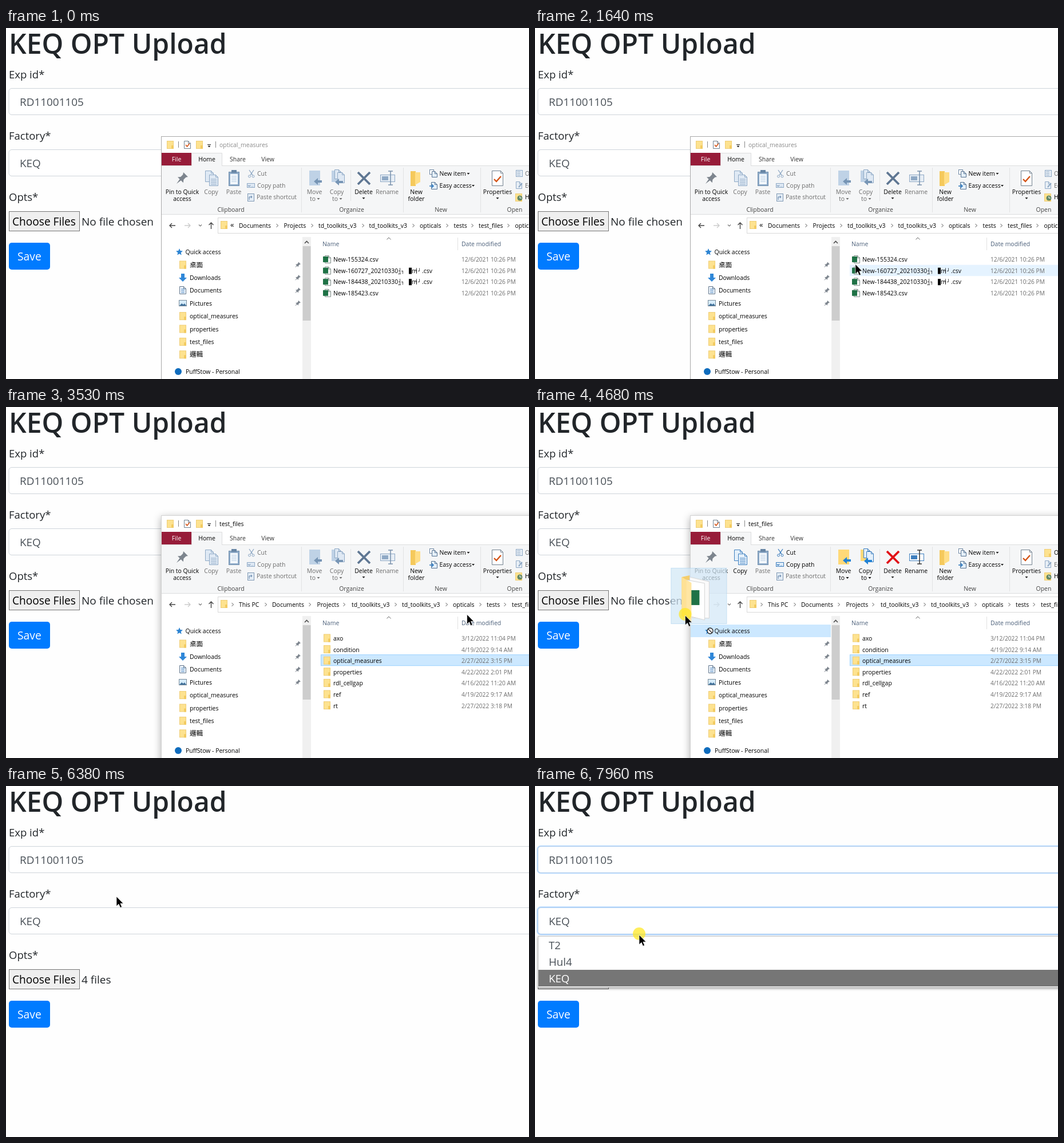
An HTML page for the animation above (8000 ms loop, 914 by 613 pixels).

```html
<!DOCTYPE html>
<html lang="en">
<head>
<meta charset="utf-8">
<title>Upload form</title>
<style>
  html, body { margin: 0; width: 100%; height: 100%; overflow: hidden; background: #fefefe; }
  svg { display: block; width: 914px; height: 613px; font-family: "Open Sans", "Noto Sans CJK TC", "Noto Sans CJK JP", "Noto Sans", sans-serif; }
  text { white-space: pre; }
  .active { filter: drop-shadow(0 4px 7px rgba(0, 0, 0, .32)); }
</style>
</head>
<body>
<svg id="stage" viewBox="0 0 914 613"></svg>
<script>
const LOOP = 8000, ROW = 19.6, ROW_TOP = 394;
const INK = '#212529', FIELD = '#495057', DIM = '#6d6d6d', SITE = 'KEQ';

// Drawing helpers
const text = (x, y, s, o = {}) =>
  `<text x="${x}" y="${y}" font-size="${o.size || 10.45}" fill="${o.fill || '#000'}" text-anchor="${o.mid ? 'middle' : 'start'}" font-weight="${o.weight || 400}">${s}</text>`;
const rect = (x, y, w, h, fill, stroke = 'none', more = '') =>
  `<rect x="${x}" y="${y}" width="${w}" height="${h}" fill="${fill}" stroke="${stroke}" ${more}/>`;
const path = (d, fill, stroke = 'none', width = 1, more = '') =>
  `<path d="${d}" fill="${fill}" stroke="${stroke}" stroke-width="${width}" ${more}/>`;
const disc = (x, y, r, fill, more = '') => `<circle cx="${x}" cy="${y}" r="${r}" fill="${fill}" ${more}/>`;
const group = (id, body, more = '') => `<g id="${id}" ${more}>${body}</g>`;
const at = (x, y, body, scale = 1) => `<g transform="translate(${x} ${y}) scale(${scale})">${body}</g>`;
const label = (x, y, s, fill) => text(x, y, s, { mid: true, fill });
const caret = (x, y, fill = '#222') => path(`M${x - 2.5} ${y}h5l-2.5 3z`, fill);
const chevron = (x, y) => path(`M${x - 1.5} ${y - 3}l3 3-3 3`, 'none', '#555');
const page = (x, y, w, h, fill, line) =>
  path(`M${x} ${y}h${w - 4}l4 4v${h - 4}h${-w}z`, fill, line) + path(`M${x + w - 4} ${y}v4h4`, 'none', line);
const folder = (x, y, s = 1) => at(x, y, rect(.5, .5, 11, 13, '#fde28f', '#efcd74') +
  path('M8 8h4v6h-4z', '#f3cb62'), s);
const pin = (x, y, s = 1) => at(x, y, path('M6 0l4 4-1.8.4-2 2-.3 2.7-2-2L0 10l2.8-4L1 4.2 3.6 4l2-2z', '#7d858e'), s);
const linesIn = (x, y, w, n, color) =>
  path(Array.from({ length: n }, (_, i) => `M${x} ${y + i * 3}h${w}`).join(''), 'none', color);

// Web form
function field(id, y, value) {
  const box = (fill, stroke, more) => rect(5, y, 930, 46, fill, stroke, `rx="5" ${more || ''}`);
  return box('none', '#007bff', `id="${id}Ring" stroke-opacity=".25"`) + box('#fff', '#ced4da') +
    box('none', '#80bdff', `id="${id}Edge"`) + text(24, y + 30.5, value, { size: 18.9, fill: FIELD });
}
function form() {
  const cap = (y, s) => text(5, y, s, { size: 18.5, fill: INK });
  return text(5, 45, SITE + ' OPT Upload', { size: 48, fill: INK, weight: 600 }) +
    cap(88, 'Exp id*') + field('exp', 105.5, 'RD11001105') +
    cap(195, 'Factory*') + field('fac', 212.5, SITE) + cap(302, 'Opts*') +
    rect(5.5, 320.5, 123, 34, '#efefef', '#767676') +
    text(11, 345, 'Choose Files', { size: 19.1 }) +
    group('none', text(132, 345, 'No file chosen', { size: 19, fill: INK })) +
    group('four', text(132, 345, '4 files', { size: 19, fill: INK })) +
    rect(5, 375, 72, 47, '#007bff', 'none', 'rx="5"') +
    text(20, 406, 'Save', { size: 19.3, fill: '#fff' });
}
function menu() {
  const item = (y, s, fill = FIELD) => text(24, y, s, { size: 18.7, fill });
  return rect(5.5, 262.5, 930, 89, '#fff', '#c4c4c4', 'style="filter:drop-shadow(0 2px 2px rgba(0,0,0,.35))"') +
    rect(6, 321, 920, 29, '#767676') +
    item(285, 'T2') + item(314, 'Hul4') + item(343, SITE, '#fff');
}

// Ribbon commands that depend on the selection
function commands(on) {
  const ink = on ? '#000' : DIM, blue = on ? '#3f7fbe' : '#8fa9c5', pale = on ? '#e4f0fb' : '#dfe9f4';
  const fold = on ? '#ffd978' : '#bfd2e6', arrow = on ? '#2282d4' : '#7795b5';
  const left = (x, y) => path(`M${x} ${y}l7-6v4h7v4h-7v4z`, arrow);
  return page(348.5, 249.5, 14, 19, pale, blue) + page(355.5, 256.5, 15, 19, pale, blue) +
    linesIn(358, 264, 10, 4, blue) + label(358.5, 290, 'Copy', ink) +
    path('M425 248l6 9M433 248l-6 9', 'none', blue, 1.3) +
    `<g fill="none" stroke="${blue}">${disc(425.5, 259, 2, 'none')}${disc(432, 259, 2, 'none')}</g>` + text(439, 258, 'Cut', { fill: ink }) +
    rect(421.5, 271.5, 13, 7, pale, blue) + path('M423 274l1 3 1-2 1 2 1-3m2 3h1m1 0h1', 'none', blue) +
    text(439, 279, 'Copy path', { fill: ink }) +
    rect(530, 249, 19, 26, fold) + left(538, 268) +
    label(539, 290, 'Move', ink) + label(536, 302, 'to', ink) + caret(546, 297, ink) +
    rect(569, 249, 14, 20, fold) + page(574.5, 247.5, 11, 16, pale, blue) + page(579.5, 252.5, 12, 18, pale, blue) + left(575, 269) +
    label(578, 290, 'Copy', ink) + label(575, 302, 'to', ink) + caret(585, 297, ink) +
    path('M615 252l21 21M636 252l-21 21', 'none', on ? '#e11218' : '#5f7793', 3.8) +
    rect(654.5, 256.5, 25, 12, on ? '#fff' : '#e7eef5', blue) + rect(657, 259, 11, 7, blue) +
    path('M668 250h8M672 250v24M668 274h8', 'none', on ? '#333' : '#7790ac', 1.5) + label(666, 290, 'Rename', ink) +
    (on ? folder(890, 248) : rect(891.5, 248.5, 11, 11, '#e7eef5', blue) + linesIn(893, 251, 6, 3, blue)) +
    text(907, 258, 'Open', { fill: ink });
}
function ribbon() {
  return rect(272, 240, 660, 85, '#f5f6f7') + path('M272 240.5h53M377 240.5h540M272 325.5h650', 'none', '#dcddde') +
    rect(272, 218, 52, 22, '#971c39') + label(298, 233, 'File', '#fff') +
    path('M324.5 241v-22.5h53V241', '#f5f6f7', '#dcddde') +
    label(351, 233, 'Home') + label(405, 233, 'Share', '#333') + label(457.5, 233, 'View', '#333') +
    path('M516.5 244v78M694.5 244v78M829.5 244v78M602.5 248v54', 'none', '#e1e2e3') +
    pin(298, 252, 2) + label(308, 290, 'Pin to Quick') + label(308, 302, 'access') +
    rect(389.5, 251.5, 18, 24, '#8fabc8', '#7291b0') + rect(392, 255, 13, 18, '#f3f8fd') +
    rect(394, 248, 9, 5, '#6886a5') + linesIn(394, 259, 9, 4, '#b5cbe1') + label(398, 290, 'Paste', DIM) +
    rect(422.5, 289.5, 11, 13, '#e3ecf5', '#8099b4') + path('M425 300v-5h5m-2-2l2 2-2 2', 'none', '#5578a0') +
    text(438, 299, 'Paste shortcut', { fill: DIM }) +
    label(625, 290, 'Delete') + caret(625, 296) +
    rect(707, 250, 9, 26, '#f5c95c') + path('M715 252h9v17l-9 5z', '#ffde86') +
    label(717, 290, 'New') + label(717, 302, 'folder') +
    rect(740.5, 247.5, 7, 8, '#fff', '#6e87a3') + page(744.5, 250.5, 9, 10, '#e4f0fb', '#56718f') +
    text(757.5, 258, 'New item') + caret(808, 253) +
    page(743.5, 269.5, 10, 12, '#e4f0fb', '#56718f') + path('M740 276h7m-3-3l3 3-3 3', 'none', '#2b76bd', 1.4) +
    text(757.5, 279, 'Easy access') + caret(816.5, 274) +
    page(849.5, 249.5, 19, 26, '#fff', '#72818f') + path('M853 264l4 4 8-9', 'none', '#d45216', 2.4) +
    label(859, 290, 'Properties') + caret(859, 296) +
    page(891.5, 268.5, 10, 12, '#e7eef5', '#8fa9c5') + path('M896 278l6-7', 'none', '#8fa9c5', 2) + text(907, 279, 'Edit', { fill: DIM }) +
    folder(890, 289) + disc(898, 297, 4.5, '#638765') + path('M898 294v3h3', 'none', '#fff') + text(907, 299, 'History') +
    [[393, 'Clipboard'], [604, 'Organize'], [760, 'New'], [889, 'Open']].map(([x, s]) => label(x, 321, s, '#444')).join('') +
    group('cmdOff', commands(false)) + group('cmdOn', commands(true));
}

function sidebar() {
  const names = ['桌面', 'Downloads', 'Documents', 'Pictures', 'optical_measures', 'properties', 'test_files', '邏輯'];
  const icons = {
    1: path('M306 429h6v7h4l-7 7-7-7h4z', '#2f87d8'),
    2: page(303.5, 451.5, 11, 13, '#eef5fc', '#65788d') + linesIn(306, 456, 6, 3, '#3f7dbb'),
    3: rect(302.5, 475.5, 13, 10, '#d7ecfa', '#788b9b') + path('M303 485l4-4 3 2 2-2 3 4z', '#41729b')
  };
  return group('quick', rect(272, 380, 245, 22, '#cce8ff')) +
    path('M303 385l1.7 4 4.3.4-3.3 2.8 1 4.3-3.7-2.3-3.7 2.3 1-4.3-3.3-2.8 4.3-.4z', '#2d84d2') +
    group('block', disc(306, 391, 5, '#fff', 'stroke="#222" stroke-width="1.3"') + path('M302.5 387.5l7 7', 'none', '#222', 1.3)) +
    text(313.5, 395, 'Quick access') +
    names.map((s, i) => {
      const y = 413.5 + i * 22.4;
      return (icons[i] || folder(303, y - 7)) + text(321, y + 4, s, { size: i % 7 ? 10.45 : 11.6 }) + (i < 4 ? pin(505, y - 5) : '');
    }).join('') +
    disc(301, 600, 6, '#0f6cbd') + text(314, 604, 'PuffStow - Personal') +
    rect(518, 365, 15, 250, '#f0f0f0') + rect(518.5, 381, 14, 130, '#cdcdcd') + path('M522 376l3.5-3.5 3.5 3.5', 'none', '#505050', 1.6);
}

const crumbs = (list, arrows) => list.map(([x, s]) => text(x, 348.5, s)).join('') + arrows.map(x => chevron(x, 345)).join('');
const rowY = i => ROW_TOP + i * ROW;
const dateCell = (i, s) => text(796, rowY(i) + 14, s, { size: 10.2, fill: DIM });

function filesView() {
  const names = ['New-155324', 'New-160727_20210330_', 'New-184438_20210330_', 'New-185423'];
  return text(373, 208, 'optical_measures', { fill: '#8a8a8a' }) + text(392, 348, '«', { size: 13 }) +
    group('crumbHot', rect(822.5, 332.5, 63, 25, '#e5f3ff', '#cce8ff')) +
    crumbs([[407, 'Documents'], [485.5, 'Projects'], [546, 'td_toolkits_v3'], [634.5, 'td_toolkits_v3'], [723, 'opticals'],
      [782.5, 'tests'], [826, 'test_files'], [889.5, 'optical_measures']], [474, 535, 624, 712, 771, 815, 878]) +
    names.map((s, i) => {
      const y = rowY(i), odd = i % 3;
      return page(557.5, y + 3.5, 10, 13, '#fff', '#7d8a86') + rect(554, y + 5, 9, 10, '#1f7246') +
        text(572, y + 14, s + (odd ? '' : '.csv')) +
        (odd ? `<g font-family="DejaVu Sans Mono, monospace">${text(686, y + 13, '┤┐', { size: 8.5 })}${text(715, y + 13, '┤┘', { size: 8.5 })}</g>` +
          rect(704, y + 5, 5, 11, '#000') + text(709, y + 14, 'm') + text(727, y + 14, '.csv') : '') +
        dateCell(i, '12/6/2021 10:26 PM');
    }).join('');
}
function foldersView() {
  const rows = [['axo', '3/12/2022 11:04 PM'], ['condition', '4/19/2022 9:14 AM'], ['optical_measures', '2/27/2022 3:15 PM'],
    ['properties', '4/22/2022 2:01 PM'], ['rdl_cellgap', '4/16/2022 11:20 AM'], ['ref', '4/19/2022 9:17 AM'], ['rt', '2/27/2022 3:18 PM']];
  return text(373, 208, 'test_files') +
    crumbs([[407, 'This PC'], [465, 'Documents'], [543.5, 'Projects'], [604, 'td_toolkits_v3'], [692, 'td_toolkits_v3'],
      [781, 'opticals'], [840, 'tests'], [884, 'test_files']], [396, 454, 531, 591, 681, 770, 829, 872]) +
    rect(550.5, rowY(2) - .5, 380, 19, '#cce8ff', '#99d1ff') +
    rows.map(([s, d], i) => folder(555, rowY(i) + 2.5) + text(572, rowY(i) + 14, s) + dateCell(i, d)).join('');
}
function explorer() {
  return rect(271.5, 189.5, 680, 460, '#fff', '#a9a9a9', 'id="frame"') +
    folder(281, 197) + path('M301.5 198v11M366.5 198v11', 'none', '#888') +
    page(311.5, 197.5, 11, 13, '#fff', '#72818f') + path('M314 204l2.5 3 4-5', 'none', '#d45216', 1.6) +
    folder(332, 197) + path('M352 203.5h6', 'none', '#222') + caret(355, 205.5) + ribbon() +
    path('M296 345h-10m4-4l-4 4 4 4', 'none', '#444', 1.4) + path('M312 345h10m-4-4l4 4-4 4', 'none', '#ccc', 1.4) +
    path('M337 343.5l2.5 2.5 2.5-2.5', 'none', '#777', 1.2) + path('M358.500 351v-11m-4 4l4-4 4 4', 'none', '#444', 1.4) +
    rect(370.5, 331.5, 560, 27, '#fff', '#d9d9d9') + folder(375, 337) + sidebar() +
    path('M665.500 369.500l3.500-3.500 3.500 3.500', 'none', '#666') +
    path('M789.5 366v22', 'none', '#e2e2e2', 1, 'id="divider"') +
    text(553, 381, 'Name', { fill: '#4c607a' }) + text(796, 381, 'Date modified', { fill: '#4c607a' }) +
    rect(550, 0, 380, ROW, '#e5f3ff', 'none', 'id="hover"') +
    group('files', filesView()) + group('folders', foldersView());
}

// Origin is the pointer tip
function ghost() {
  return rect(-24.5, -82.5, 97, 97, '#d3e8f7', '#acd3ee', 'opacity=".72"') +
    path('M-6-67l14-3v78l-14-7z', '#f4cd6c') +
    path('M8-67l34 8v64l-34-1z', '#fafafa', '#d5d5d5') + path('M2-62l32 6v64l-32-8z', '#fff', '#d5d5d5') +
    rect(10, -44, 15, 26, '#1f7246') + path('M-6-67l17 10v68l-17-10z', '#ffe49a', 'none', 1, 'opacity=".9"');
}

document.getElementById('stage').innerHTML = rect(0, 0, 914, 613, '#fefefe') + form() + group('window', explorer()) + group('menu', menu()) +
  group('pointer', group('drag', ghost()) + disc(0, -2, 11, '#ffe81f', 'id="press" opacity=".72"') +
    path('M0 0V17L4 13.3 6.700 19.500 9.500 18.300 6.900 12.300H12Z', '#000', '#fff', .7));

// Pointer route: time, x, y
const route = [[0, 940, 550], [330, 930, 545], [400, 908, 536], [700, 730, 500], [1000, 575, 462], [1160, 527, 440], [1230, 523, 415],
  [1430, 556, 368], [1640, 560, 412], [1850, 545, 488], [1990, 538, 495], [2060, 541, 490], [2270, 622, 366],
  [2500, 730, 346], [2820, 845, 337], [3180, 846, 338], [3530, 806, 362], [3950, 618, 447], [4020, 615, 450],
  [4300, 615, 450], [4680, 263, 364], [4900, 130, 335], [5150, 55, 335], [5220, 46, 338], [5900, 46, 338],
  [6060, 80, 373], [6380, 193, 193], [6720, 198, 148], [6790, 197, 145], [7000, 188, 176], [7260, 188, 176],
  [7700, 184, 245], [7900, 182, 260], [8000, 182, 260]];
const el = id => document.getElementById(id);
const show = (id, on) => { el(id).style.display = on ? '' : 'none'; };
const within = (t, a, b) => t >= a && t < b;
const ramp = (t, start) => Math.min(1, Math.max(0, (t - start) / 150));

function pointerAt(t) {
  const i = route.findIndex(p => p[0] > t), [t0, x0, y0] = route[i - 1], [t1, x1, y1] = route[i];
  const k = (t - t0) / (t1 - t0);
  return [x0 + (x1 - x0) * k, y0 + (y1 - y0) * k];
}
function focus(id, k) {
  el(id + 'Ring').setAttribute('stroke-width', 8 * k);
  el(id + 'Edge').setAttribute('opacity', k);
}
function draw(now) {
  const t = now % LOOP, [x, y] = pointerAt(t);
  const moved = t >= 3180, dropped = t >= 5480;
  el('pointer').setAttribute('transform', `translate(${x.toFixed(1)} ${y.toFixed(1)})`);
  show('press', within(t, 3030, 3180) || within(t, 4020, 5480) || within(t, 6780, 6960) || t >= 7850);
  show('drag', within(t, 4350, 5480));

  show('window', t < 5520);
  show('files', !moved);
  show('folders', moved);
  show('cmdOff', t < 3670);
  show('cmdOn', t >= 3670);
  el('frame').setAttribute('class', moved ? 'active' : '');
  el('frame').setAttribute('stroke', moved ? '#d2d2d2' : '#a9a9a9');
  show('crumbHot', within(t, 2820, 3180));
  show('quick', within(t, 4540, 4860));
  show('block', within(t, 4540, 4860));
  el('divider').setAttribute('stroke', !moved && x > 540 && within(y, 362, 389) ? '#b5dcf2' : '#e2e2e2');

  const row = Math.floor((y + 3 - ROW_TOP) / ROW);
  show('hover', t < 4020 && x > 550 && within(row, 0, moved ? 7 : 4));
  el('hover').setAttribute('y', rowY(row));

  show('none', !dropped);
  show('four', dropped);
  focus('exp', ramp(t, 6790) - ramp(t, 7880));
  focus('fac', ramp(t, 7880));
  show('menu', t >= 7930);
}
const start = performance.now();
function tick() {
  draw(performance.now() - start);
  requestAnimationFrame(tick);
}
tick();
</script>
</body>
</html>
```
